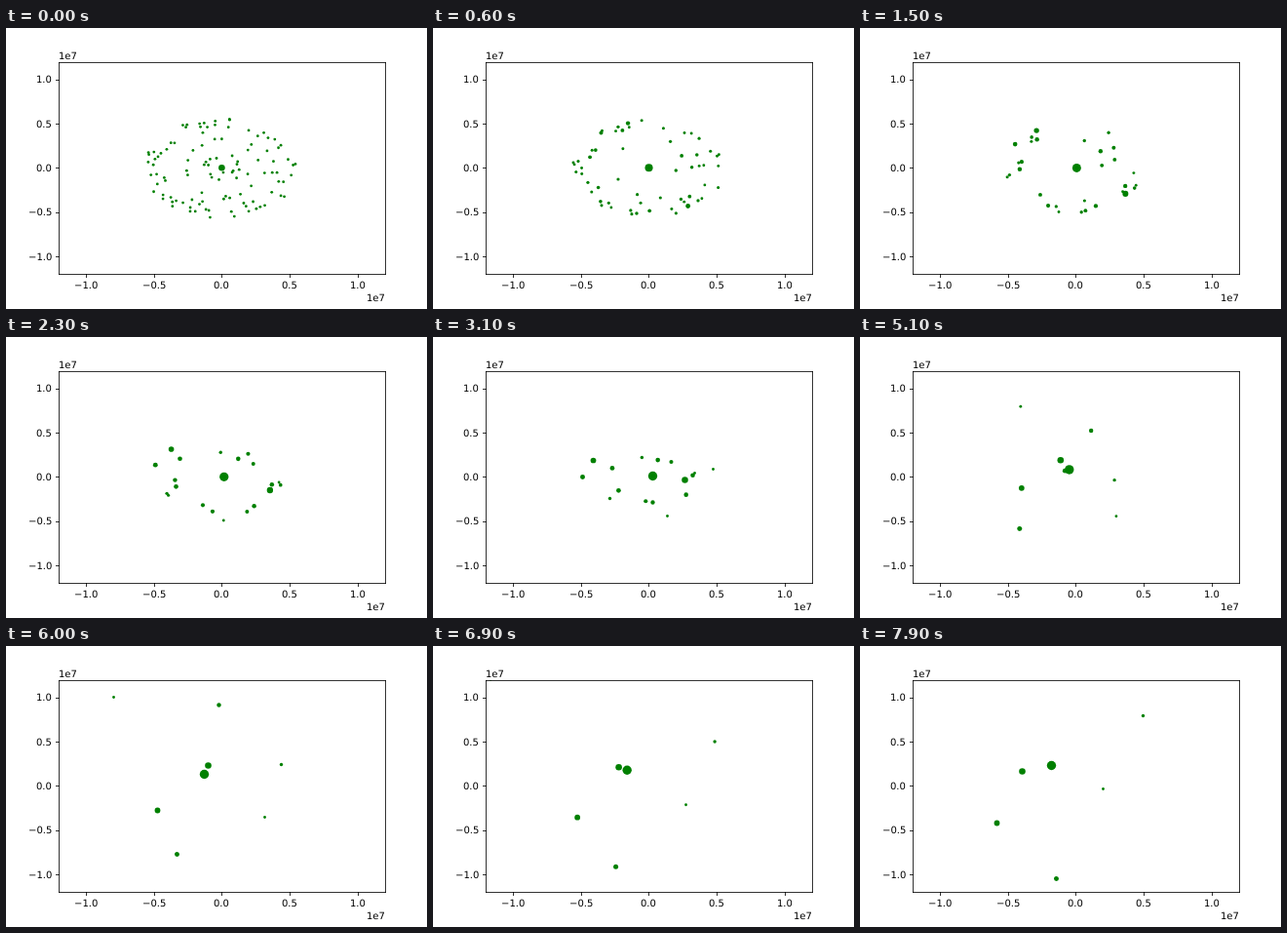
Write an HTML page with a canvas that moves like this. It is 432 by 288 pixels and loops after 8 s.

```html
<!DOCTYPE html>
<html lang="en">
<head>
<meta charset="utf-8">
<title>Merging bodies</title>
<style>
  html, body { margin: 0; width: 100%; height: 100%; overflow: hidden; background: #fff; }
  canvas, svg { position: absolute; left: 0; top: 0; width: 432px; height: 288px; }
  text { font: 10px "DejaVu Sans", sans-serif; fill: #000; text-rendering: geometricPrecision; }
  path { fill: none; stroke: #000; stroke-width: 0.8; }
</style>
</head>
<body>
<canvas width="432" height="288"></canvas>
<svg viewBox="0 0 432 288"></svg>
<script>
const LOOP = 8000, STEP = 100;
const MID = { x: 221.4, y: 143.28 };
const UNIT = { x: 13.95, y: 9.06 };  // pixels per 1e6
const SPIN = 0.00034;                // radians per ms
const RIM = 5.3;                     // disc radius in 1e6
const CROWD = 112, FIRST = 10;       // bodies at the start, lowest rank in the swarm
const KEYS = [3100, 4300, 6000, 7900];

// Lasting bodies: on the disc until the first key, then along these points
const paths = [
  [225, 142, 224, 139, 203, 131, 196, 122],
  [153, 143, 155, 178, 175, 213, 201, 238],
  [164, 126, 172, 141, 155, 168, 140, 181],
  [258, 146, 207, 132, 207, 122, 166, 128],
  [225, 169, 249, 126, 218, 60, 207, -20],
  [181, 165, 234, 164, 282, 121, 290, 71],
  [268, 139, 211, 91, 110, 52, 2, 14],
  [240, 183, 256, 187, 265, 175, 249, 146]
];
const sizes = [4.7, 2.5, 2.9, 3.3, 2.2, 1.7, 1.4, 1.4];

function seeded(seed) {
  return () => {
    seed = (seed + 0x6d2b79f5) | 0;
    let h = Math.imul(seed ^ (seed >>> 15), 1 | seed);
    h = (h + Math.imul(h ^ (h >>> 7), 61 | h)) ^ h;
    return ((h ^ (h >>> 14)) >>> 0) / 4294967296;
  };
}

const grow = (from, to, t) => to - (to - from) * Math.exp(-t / 800);

function onDisc(centre, radius, angle) {
  return {
    x: centre.x + radius * Math.cos(angle) * UNIT.x,
    y: centre.y - radius * Math.sin(angle) * UNIT.y
  };
}

const lasting = paths.map((path, i) => {
  const points = KEYS.map((t, k) => ({ t, x: path[2 * k] + 0.5, y: path[2 * k + 1] + 0.5 }));
  const dx = (points[0].x - MID.x) / UNIT.x, dy = (MID.y - points[0].y) / UNIT.y;
  return {
    points,
    radius: Math.hypot(dx, dy),
    angle: Math.atan2(dy, dx),
    rim: i ? RIM : 0,
    small: i ? 1.4 : 3.3,
    big: sizes[i]
  };
});

function speed(points, k, axis) {
  const a = points[Math.max(k - 1, 0)], b = points[Math.min(k + 1, points.length - 1)];
  return (b[axis] - a[axis]) / (b.t - a.t);
}

function along(points, t) {
  let k = 0;
  while (k < points.length - 2 && t >= points[k + 1].t) k++;
  const a = points[k], b = points[k + 1], span = b.t - a.t;
  const u = (t - a.t) / span, v = 1 - u;
  const curve = axis => a[axis] * v * v * (1 + 2 * u) + b[axis] * u * u * (3 - 2 * u)
    + span * u * v * (v * speed(points, k, axis) - u * speed(points, k + 1, axis));
  return { x: curve("x"), y: curve("y") };
}

function placeLasting(body, t) {
  const { points, radius, angle, rim } = body;
  const lead = points[0].t - t;
  const inward = (t / points[0].t) ** 2;
  const p = lead > 0
    ? onDisc(MID, rim + (radius - rim) * inward, angle - lead * SPIN)
    : along(points, t);
  return { ...p, r: grow(body.small, body.big, t) };
}

// The crowd thins as CROWD / (1 + t / 600), so rank sets the lifetime.
const random = seeded(11);
const swarm = Array.from({ length: CROWD - FIRST }, (_, i) => {
  const rank = FIRST + 1 + i, u = random();
  return {
    end: 600 * (CROWD / rank - 1) + STEP,
    radius: rank > CROWD - 16 ? 0.3 + 1.4 * u : 5.7 * u ** 0.28,
    angle: 2.4 * rank + random(),
    big: 1.4 + Math.min(1, 20 * random() / rank)
  };
});

function placeSwarm(body, t, centre) {
  const shrink = Math.max(0, 1 - (t / 5300) ** 2);
  const p = onDisc(centre, body.radius * shrink, body.angle + t * SPIN);
  return { ...p, r: grow(1.4, body.big, t) };
}

// One light body is flung out of the centre
function flung(t) {
  const s = Math.max(0, t - 2500);
  return { x: 227.5 + s * 0.1, y: 143.5 - s * 0.0133, r: 1.4 };
}

const ctx = document.querySelector("canvas").getContext("2d");
ctx.beginPath();
ctx.rect(54, 35, 335, 217);
ctx.clip();
ctx.fillStyle = "#008000";

function disc({ x, y, r }) {
  ctx.beginPath();
  ctx.arc(x, y, r, 0, 2 * Math.PI);
  ctx.fill();
}

function draw(t) {
  ctx.clearRect(0, 0, 432, 288);
  const placed = lasting.map(body => placeLasting(body, t));
  placed.forEach(disc);
  for (const body of swarm) if (t < body.end) disc(placeSwarm(body, t, placed[0]));
  if (t > 2500) disc(flung(t));
}

function drawAxes() {
  const snap = v => Math.floor(v + 0.5) + 0.5;
  const line = (d, cap = "butt") => `<path d="${d}" stroke-linecap="${cap}"/>`;
  const text = (x, y, s) => `<text x="${Math.round(x)}" y="${Math.round(y)}">${s}</text>`;
  let out = ["M54.5 35.5H389.5", "M54.5 252.5H389.5", "M54.5 35.5V252.5", "M389.5 35.5V252.5"]
    .map(d => line(d, "square")).join("");
  for (let n = -2; n <= 2; n++) {
    const x = MID.x + n * 5 * UNIT.x, y = MID.y - n * 5 * UNIT.y;
    const label = (n / 2).toFixed(1).replace("-", "\u2212");
    const width = n < 0 ? 24.3 : 15.9;
    out += line(`M${snap(x)} 252V256`) + line(`M55 ${snap(y)}H51`);
    out += text(x - width / 2, 267, label) + text(47 - width, y + 3.8, label);
  }
  out += text(54, 32, "1e7") + text(370, 280, "1e7");
  document.querySelector("svg").innerHTML = out;
}

drawAxes();
const start = performance.now();
function tick() {
  const t = (performance.now() - start) % LOOP;
  draw(Math.floor(t / STEP) * STEP);
  requestAnimationFrame(tick);
}
tick();
</script>
</body>
</html>
```
